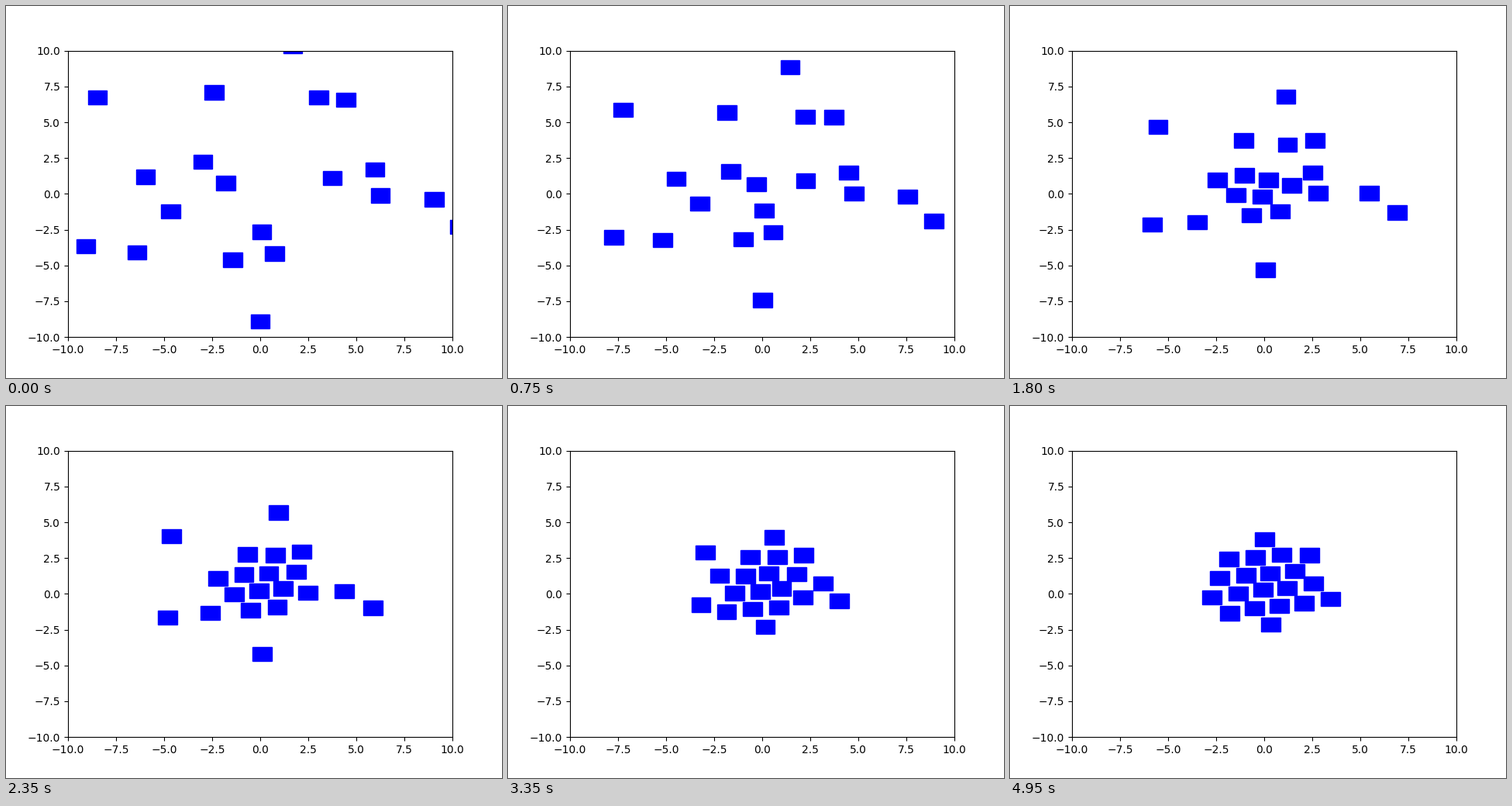
A matplotlib script that plays this animation: 640 by 480 pixels, repeating every 5 s.

```python
import numpy as np
import matplotlib.pyplot as plt
from matplotlib.animation import FuncAnimation
from matplotlib.patches import Rectangle

FRAMES, INTERVAL = 100, 50
SPEED = 0.1         # pull towards the middle of the swarm, units per frame
SPACING = 1.5       # squares closer than this push each other away
STIFFNESS = 0.55    # push per frame and unit of missing space
SUBSTEPS = 5

START = [
    (1.69, 10.33), (-8.47, 6.73), (-2.40, 7.08), (3.04, 6.73), (4.44, 6.57),
    (-5.97, 1.19), (-2.98, 2.24), (-1.79, 0.75), (3.75, 1.10), (5.97, 1.70),
    (6.25, -0.11), (9.05, -0.38), (10.38, -2.31), (-4.66, -1.22),
    (-9.07, -3.66), (-6.41, -4.09), (0.08, -2.66), (-1.43, -4.60),
    (0.75, -4.17), (0.00, -8.91)]


def length(vectors):
    return np.linalg.norm(vectors, axis=-1, keepdims=True)


def velocity(pos):
    to_middle = pos.mean(axis=0) - pos
    pull = SPEED * to_middle / np.maximum(length(to_middle), SPEED)

    apart = pos[:, None] - pos
    dist = np.maximum(length(apart), 1e-9)
    overlap = np.maximum(SPACING - dist, 0)
    push = STIFFNESS * (overlap * apart / dist).sum(axis=1)
    return pull + push


def simulate():
    pos = np.array(START)
    track = [pos]
    for _ in range(FRAMES - 1):
        for _ in range(SUBSTEPS):
            pos = pos + velocity(pos) / SUBSTEPS
        track.append(pos)
    return track


track = simulate()

fig, ax = plt.subplots(figsize=(6.4, 4.8), dpi=100)
ax.set_xlim(-10, 10)
ax.set_ylim(-10, 10)
squares = [ax.add_patch(Rectangle((0, 0), 1, 1, color="blue")) for _ in START]


def update(frame):
    for square, centre in zip(squares, track[frame]):
        square.set_xy(centre - 0.5)
    return squares


anim = FuncAnimation(fig, update, frames=FRAMES, interval=INTERVAL,
                     init_func=lambda: update(0), repeat=True, repeat_delay=0)
plt.show()
```
